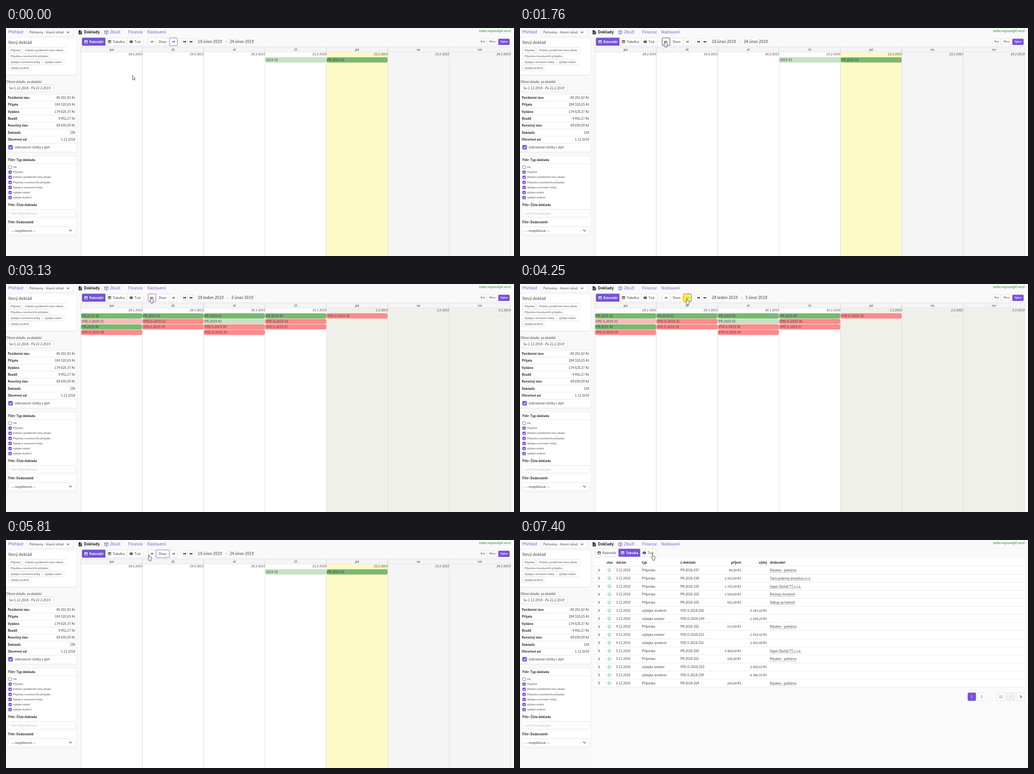
Write an HTML page that moves like this. It is 1115 px wide and 502 px high and loops after 8000 ms.

```html
<!DOCTYPE html>
<html lang="cs">
<head>
<meta charset="utf-8">
<title>Doklady</title>
<style>
  html, body { margin: 0; width: 100%; height: 100%; overflow: hidden; background: #f9f9f9; }
  svg { display: block; width: 100vw; height: 100vh; }
  text {
    font-family: "Noto Sans CJK SC", "Noto Sans CJK JP", "Noto Sans CJK", "Noto Sans", sans-serif;
    white-space: pre;
  }
  .accented { font-family: "Noto Sans", sans-serif; }
  .toggle { visibility: hidden; }
  .toggle.on { visibility: visible; }
</style>
</head>
<body>
<svg id="stage" viewBox="0 0 1115 502" preserveAspectRatio="none"></svg>
<script>
const LOOP = 8000;
const PURPLE = '#7653d3', INK = '#3c3c3c', LINE = '#dcdcdc';
const stage = document.getElementById('stage');

// The CJK family lacks the Czech caron letters, so those name their own font.
const accented = (str) => str.replace(/[\u0100-\u017f]+/g, '<tspan class="accented">$&</tspan>');

// Drawing helpers: each returns SVG markup; text is placed by its vertical middle.
const rect = (x, y, w, h, fill, stroke = 'none', r = 0, extra = '') =>
  `<rect x="${x}" y="${y}" width="${w}" height="${h}" rx="${r}" fill="${fill}" stroke="${stroke}" stroke-width=".8" ${extra}/>`;
const path = (d, stroke = INK, width = 1, fill = 'none') =>
  `<path d="${d}" stroke="${stroke}" stroke-width="${width}" fill="${fill}"/>`;
const text = (x, cy, str, size = 7.05, { fill = INK, bold, anchor = 'start', extra = '' } = {}) =>
  `<text x="${x}" y="${(cy + size * .36).toFixed(2)}" font-size="${size}" fill="${fill}" text-anchor="${anchor}" ${bold ? 'font-weight="600"' : ''} ${extra}>${accented(str)}</text>`;
const at = (x, y, markup) => `<g transform="translate(${x} ${y})">${markup}</g>`;
const list = (items, draw) => items.map(draw).join('');
const chevron = (x, y) => path(`M${x - 3} ${y - 1.7}l3 3 3-3`, PURPLE, 1.5);

function checkbox(x, y, size, checked) {
  const k = size / 7;
  return rect(x, y, size, size, checked ? PURPLE : '#fff', checked ? PURPLE : '#555', 1.2) +
    (checked ? path(`M${x + 1.6 * k} ${y + 3.6 * k}l${1.5 * k} ${1.5 * k} ${2.6 * k} ${-3 * k}`, '#fff', 1.1 * k) : '');
}

function topMenu() {
  const link = { fill: PURPLE };
  return text(5, 9, 'Přehled', 8.9, link) +
    rect(46.5, .5, 101, 17.5, '#fff', LINE, 2) + text(51, 9.5, 'Potraviny - hlavní sklad', 7) + chevron(136, 9.5) +
    path('M159.5 5h4.3l2.7 2.7v6.3h-7z', 'none', 0, '#222') +
    path('M163.5 5v3h3M161 10h4M161 12h4', '#fff', .7) +
    text(171, 9, 'Doklady', 8.6, { bold: true, fill: '#222' }) +
    path('M216.5 7l3.7-1.8 3.7 1.8v5l-3.7 2-3.7-2zl3.7 2 3.7-2M220.2 9v5', PURPLE, 1) +
    text(228, 9, 'Zboží', 8.9, link) + text(268, 9, 'Finance', 8.9, link) +
    text(310, 9, 'Nastavení', 8.9, link) +
    text(1108, 6.5, 'máte nejnovější verzi', 6.7, { bold: true, fill: '#4cb83c', anchor: 'end' });
}

function sidebar() {
  const kinds = ['Příjemka', 'Doklad o počátečním stavu skladu', 'Příjemka z inventurního přebytku',
    'Výdejka z inventurní ztráty', 'výdejka ostatní', 'výdejka studenti'];
  const places = [[5, 42, 29], [37, 42, 94], [5, 55, 91], [5, 68, 75], [80, 68, 47], [5, 81, 51]];
  const totals = [['Počáteční stav', '80 202,82 Kč'], ['Přijato', '184 320,65 Kč'],
    ['Vydáno', '-174 828,37 Kč'], ['Rozdíl', '9 492,27 Kč'], ['Konečný stav', '89 695,09 Kč'],
    ['Dokladů', '158'], ['Otevřené od', '1.12 2018']];
  const card = (x, y, w, h) => rect(x, y + 1, w, h, '#e4e4e4', 'none', 2) + rect(x, y, w, h, '#fff', '#e8e8e8', 2);
  const title = (y, str) => text(5, y, str, 6.8, { bold: true, fill: '#222' });
  return card(-1, 21.5, 156.5, 82) + text(5, 31.5, 'Nový doklad', 8.9) +
    list(kinds, (kind, i) => {
      const [x, y, w] = places[i];
      return rect(x + .5, y + .5, w, 12.5, '#fff', LINE, 1) + text(x + 5, y + 6.7, kind, 5.3);
    }) +
    text(1, 118, 'Obrat skladu  za období', 7) +
    rect(.5, 124.5, 104, 16, '#fff', LINE, 1.5) + text(7, 132.5, 'So 1.12.2018 - Pá 22.2.2019', 7.25) +
    card(-1, 146, 156.5, 127) +
    list(totals, ([label, value], i) => {
      const y = 153.3 + i * 15.4;
      return text(4, y, label, 6.8, { bold: true, fill: '#222' }) +
        text(152, y, value, 7.2, { anchor: 'end' }) + path(`M0 ${y + 7.7}h155`, '#e2e2e2', .8);
    }) +
    checkbox(5.5, 258, 9, true) + text(19, 262.5, 'zobrazovat částky s dph', 7) +
    card(2.5, 282, 153, 175.5) + title(290.5, 'Filtr: Typ dokladu') + path('M3 298.5h152', '#e8e8e8', .8) +
    list(['Vše', ...kinds], (kind, i) => {
      const y = 306.2 + i * 11.2;
      return checkbox(5.7, y - 3.2, 6.6, i > 0) + text(15.5, y, kind, 5.25);
    }) +
    title(389.5, 'Filtr: Číslo dokladu') + rect(5.5, 399.5, 147, 17, '#fff', LINE, 2) +
    text(10, 408, 'část čísla dokladu...', 7, { fill: '#bbb' }) +
    title(427.5, 'Filtr: Dodavatelé') + rect(5.5, 437.5, 147, 17, '#fff', LINE, 2) +
    text(10, 446, '--- neaplikovat ---', 6.95) + chevron(141.5, 446);
}

const calendarIcon = (c) => path('M.5 1.5h6v5h-6zM2 0v2M5 0v2', c, 1) + path('M.5 2.6h6', c, 1.4);
const tableIcon = (c) => path('M.5 .8h6v5.6h-6zM.5 3.7h6M3.5 1v5', c, .8) + path('M.5 1.3h6', c, 1.4);
const printIcon = (c) => path('M1.8 2.5v-2h3.6v2', c, .9) + path('M0 2.4h7.2v3H0z', 'none', 0, c) +
  path('M1.8 4.4h3.6v2.2H1.8z', c, .8, '#fff');

function tabs(active) {
  const items = [['Kalendář', 167, 51.5, calendarIcon], ['Tabulka', 218.5, 47.5, tableIcon], ['Tisk', 266, 35, printIcon]];
  return list(items, ([label, x, w, icon], i) => {
    const on = i === active, fill = on ? '#fff' : INK;
    return rect(x, 21.8, w, 16.8, on ? PURPLE : '#fff', on ? PURPLE : LINE, 1.5) +
      at(x + 5.2, 26.6, icon(fill)) + text(x + 16, 30.2, label, on ? 6.9 : 7.1, { fill, bold: on });
  });
}

const buttons = { prev: [312, 17], today: [329.5, 29], next: [359, 17] };

function navigation() {
  const tri = (x, dir) => path(`M${x} 28.2v4l${3 * dir}-2z`, 'none', 0, '#333');
  const bar = (x) => path(`M${x} 28.1v4.2`, '#333', 1);
  const scale = [['Rok', 1037.5, 18], ['Měsíc', 1056, 24.5], ['Týden', 1081, 24]];
  return list(Object.values(buttons), ([x, w]) => rect(x, 21.8, w, 17, '#fff', LINE, 1.5)) +
    bar(318.8) + tri(322.6, -1) + text(344, 30.4, 'Dnes', 7.3, { anchor: 'middle' }) + tri(365.8, 1) + bar(369.6) +
    rect(386, 23.8, 12.5, 13, '#fff', LINE, 1) + rect(399, 23.8, 12.5, 13, '#fff', LINE, 1) +
    bar(389.6) + tri(392.6, -1) + tri(395, -1) + tri(402.8, 1) + tri(405.2, 1) + bar(408.4) +
    list(scale, ([label, x, w], i) => rect(x, 24, w, 13, i === 2 ? PURPLE : '#fff', i === 2 ? PURPLE : LINE, 1.2) +
      text(x + w / 2, 30.5, label, i === 2 ? 5.3 : 5.5, { anchor: 'middle', bold: i === 2, fill: i === 2 ? '#fff' : INK }));
}

// Event kinds: green, light green, red, light red
const tones = {
  G: ['#79b96f', '#6aa862'], g: ['#c7e2c4', '#b6d6b3'],
  R: ['#ff8b8b', '#f07c7c'], r: ['#ffbaba', '#f5abab']
};
const surplus = 'g Příjemka z inventurního přebytku', loss = 'r Výdejka z inventurní ztráty';
const weeks = {
  feb18: { month: 1, day: 18, title: '18 únor 2019    -   24 únor 2019', today: 4,
    events: { 3: ['g 2019-53'], 4: ['G PR-2019-54'] } },
  feb11: { month: 1, day: 11, title: '11 únor 2019    -   17 únor 2019', events: {} },
  feb4: { month: 1, day: 4, title: '4 únor 2019    -   10 únor 2019',
    events: { 2: ['G PR-2019-45', surplus, loss, loss], 3: ['G PR-2019-46', surplus, loss, surplus, loss] } },
  jan28: { month: 0, day: 28, title: '28 leden 2019    -   3 únor 2019', events: {
    0: ['G PR-2019-38', 'r VYD-S-2019-31', 'G PR-2019-40', 'R VYD-O-2019-30'],
    1: ['G PR-2019-41', 'R VYD-O-2019-32', 'R VYD-S-2019-33'],
    2: ['G PR-2019-43', 'g PR-2019-42', 'R VYD-S-2019-35', 'R VYD-O-2019-34'],
    3: ['G PR-2019-44', 'R VYD-O-2019-36', 'R VYD-S-2019-37'],
    4: ['R VYD-O-2019-38'] } }
};

function calendar(id, { month, day, title, today, events }) {
  const left = 164.5, step = 134.7;
  const columns = list(['po', 'út', 'st', 'čt', 'pá', 'so', 'ne'], (name, i) => {
    const x = left + i * step, date = new Date(2019, month, day + i);
    const fill = i === today ? '#fdfbc5' : date.getMonth() !== month ? '#f0f0eb' : i > 4 ? '#f5f5f5' : '#fff';
    return rect(x, 53, step, 460, fill) + rect(x, 41.5, step, 11.5, '#f4f4f4', LINE) +
      path(`M${x} 41.5v461M${x + step} 41.5v461`, LINE, .9) +
      text(x + step / 2, 47.8, name, 7.3, { anchor: 'middle' }) +
      text(x + step - .3, 57.5, `${date.getDate()}.${date.getMonth() + 1} 2019`, 7.05, { anchor: 'end', extra: 'font-style="italic"' }) +
      list(events[i] || [], (event, row) => {
        const y = 65 + row * 12.15, [fill, edge] = tones[event[0]];
        return rect(x + .7, y, step - 1.3, 10.4, fill, edge, 2.8) + text(x + 2.2, y + 5.4, event.slice(2));
      });
  });
  return `<g class="toggle" id="${id}">${tabs(0)}${navigation()}${text(421, 30.2, title, 8.85)}${columns}</g>`;
}

function table() {
  const bakery = 'Klaskov - pekárna', trader = 'Vojen Sluhál TT, s.r.o.';
  // day, document type, number, amount, supplier
  const rows = [
    [3, 'P', 257, '89,00', bakery], [3, 'P', 258, '2 315,00', 'Tavo-pokrmy družstvo s.r.o.'],
    [3, 'P', 259, '1 753,00', trader], [3, 'P', 263, '2 524,00', 'Brezoly-mražené'],
    [3, 'P', 265, '552,00', 'Nákup za hotové'], [3, 'S', 250, '-5 281,04'], [3, 'O', 249, '-1 504,29'],
    [4, 'P', 262, '213,00', bakery], [4, 'O', 251, '-1 019,42'], [4, 'S', 252, '-2 893,00'],
    [5, 'P', 260, '3 468,00', trader], [5, 'P', 261, '326,00', bakery], [5, 'O', 253, '-2 008,53'],
    [5, 'S', 254, '-6 386,91'], [6, 'P', 264, '264,00', bakery]];
  const types = { P: ['Příjemka', 'PR'], S: ['výdejka studenti', 'VYD-S'], O: ['výdejka ostatní', 'VYD-O'] };
  const heads = [[190, 'stav'], [211, 'datum'], [267.5, 'typ'], [352, 'č.dokladu'], [485.5, 'příjem', 'end'],
    [542, 'výdej', 'end'], [548.5, 'dodavatel']];
  const body = list(rows, ([day, type, number, amount, vendor], i) => {
    const y = 66.5 + i * 17.75, [name, prefix] = types[type];
    return path(`M164 ${y + 8.9}h944`, '#e2e2e2', .8) + path(`M171.8 ${y - 3}l3 3-3 3`, PURPLE, 1.2) +
      `<circle cx="196" cy="${y}" r="3.2" fill="none" stroke="#35c46a" stroke-width=".9"/>` +
      path(`M194.4 ${y}l1.2 1.2 2.1-2.3`, '#35c46a', .9) +
      text(211, y, `${day}.12 2018`) + text(267.5, y, name) + text(352, y, `${prefix}-2018-${number}`) +
      text(type === 'P' ? 485.5 : 542, y, `${amount} Kč`, 7, { anchor: 'end' }) +
      (vendor ? text(548.5, y, vendor, 7.05, { extra: 'class="vendor"' }) : '');
  });
  const pages = [['1', 983], ['2', 1004.5], ['11', 1047], ['', 1068.5], ['', 1090.5]];
  return `<g class="toggle" id="table">${rect(164, 19, 944, 483, '#fafafa')}${at(-2, -2, tabs(1))}` +
    rect(164, 41, 944, 282.9, '#fff') + path('M164 57.6h944', '#e2e2e2', .8) +
    list(heads, ([x, label, anchor]) => text(x, 50, label, 6.85, { bold: true, anchor, fill: '#222' })) + body +
    list(pages, ([label, x], i) => rect(x, 336.5, 17.3, 17.3, i ? i === 3 ? '#f3f3f3' : '#fff' : PURPLE, i ? LINE : PURPLE, 1.5) +
      text(x + 8.6, 345.3, label, 7.2, { anchor: 'middle', fill: i ? INK : '#fff' })) +
    path('M1078.6 342.2l-3 3 3 3', '#bbb', 1) + path('M1097.8 342.2l3 3-3 3', '#333', 1.2) +
    text(1034.5, 344.5, '...', 7.2, { anchor: 'middle', fill: '#999' }) + '</g>';
}

const pointer =
  rect(0, 21.8, 0, 17, 'rgba(0,0,0,.025)', 'none', 1.5, 'id="hover" class="toggle"') +
  rect(0, 21.8, 0, 17, 'none', PURPLE, 1.5, 'id="focus" class="toggle"') +
  '<circle id="halo" class="toggle" r="9.8" fill="#ffe900" fill-opacity=".68"/>' +
  `<g id="cursor"><g id="arrow" class="toggle">${path('M.5 .5v9.4l2.2-2 1.6 3.4 1.5-.7-1.6-3.3h2.9z', '#333', .8, '#fff')}</g>` +
  `<g id="hand" class="toggle">${path('M2 8V1.5q0-1 .9-1t.9 1V5q.9-.8 1.6.2.9-.7 1.6.3 1.5-.5 1.6.9v3.1L7.5 11.6v2H3.1v-1.7L.5 8.5q-.2-1.2 1.5-.5z', '#222', .8, '#fff')}` +
  `${path('M4.6 9.2v2.3M6.2 9.2v2.3', '#555', .5)}</g></g>`;

stage.innerHTML = rect(0, 0, 1115, 502, '#f9f9f9') + topMenu() + sidebar() +
  list(Object.entries(weeks), ([id, week]) => calendar(id, week)) + table() + pointer;

for (const el of stage.querySelectorAll('.vendor')) {
  const y = +el.getAttribute('y') + 2.2;
  el.insertAdjacentHTML('afterend',
    `<path d="M548.5 ${y}h${el.getComputedTextLength()}" stroke="#666" stroke-width=".8" stroke-dasharray="1.2 .8"/>`);
}

// Timelines: start time in ms first
const views = [[0, 'feb18'], [1810, 'feb11'], [2500, 'feb4'], [3130, 'jan28'], [4370, 'feb4'], [5120, 'feb18'], [6860, 'table']];
const focuses = [[0, 'next'], [1620, 'prev'], [4200, 'next'], [4930, 'today'], [6440, null]];
// Press, halo end, release
const presses = [[1620, 1760, 1810], [2370, 2500, 2500], [2930, 3080, 3130], [4200, 4370, 4370], [4930, 5120, 5120], [6440, 6690, 6690]];
const route = [[0, 277, 104], [500, 277, 104], [1050, 365, 35], [1150, 365, 35], [1400, 315, 28.5],
  [3440, 315, 28.5], [3610, 349, 29], [3750, 349, 29], [4050, 363, 32], [4370, 363, 32], [4550, 367, 33],
  [4590, 367, 33], [4900, 345, 31.3], [5450, 345, 31.3], [5810, 311, 32.3], [6120, 240, 32],
  [6810, 240, 32], [7080, 280, 31.5], [7280, 280, 31.5], [7400, 288, 31]];

const current = (line, t) => line.filter(([start]) => start <= t).pop();
const show = (id, on) => document.getElementById(id).classList.toggle('on', !!on);
const place = (id, attrs) => {
  for (const key in attrs) document.getElementById(id).setAttribute(key, attrs[key]);
};

function cursorAt(t) {
  const i = route.findIndex(([time]) => time > t);
  if (i < 0) return route[route.length - 1].slice(1);
  const [t0, x0, y0] = route[i - 1], [t1, x1, y1] = route[i], k = (t - t0) / (t1 - t0);
  return [x0 + (x1 - x0) * k, y0 + (y1 - y0) * k];
}

function render(t) {
  const view = current(views, t)[1], focus = current(focuses, t)[1], [x, y] = cursorAt(t);
  for (const id of [...Object.keys(weeks), 'table']) show(id, id === view);

  show('focus', focus);
  if (focus) {
    const [left, width] = buttons[focus];
    const pressed = presses.some(([from, , to]) => t >= from && t < to);
    place('focus', { x: left, width, stroke: pressed ? '#333' : PURPLE });
  }

  const over = view !== 'table' && y < 38 &&
    [...Object.values(buttons), [218.5, 47.5]].find(([left, width]) => x + 3 >= left && x + 3 < left + width);
  show('hover', over);
  if (over) place('hover', { x: over[0], width: over[1] });

  show('halo', presses.some(([from, to]) => t >= from && t < to));
  place('halo', { cx: x + 2, cy: y - .8 });
  place('cursor', { transform: `translate(${x.toFixed(2)} ${y.toFixed(2)})` });
  show('arrow', t < 1000);
  show('hand', t >= 1000);
}

const began = performance.now();
function tick() {
  render((performance.now() - began) % LOOP);
  requestAnimationFrame(tick);
}
tick();
</script>
</body>
</html>
```
